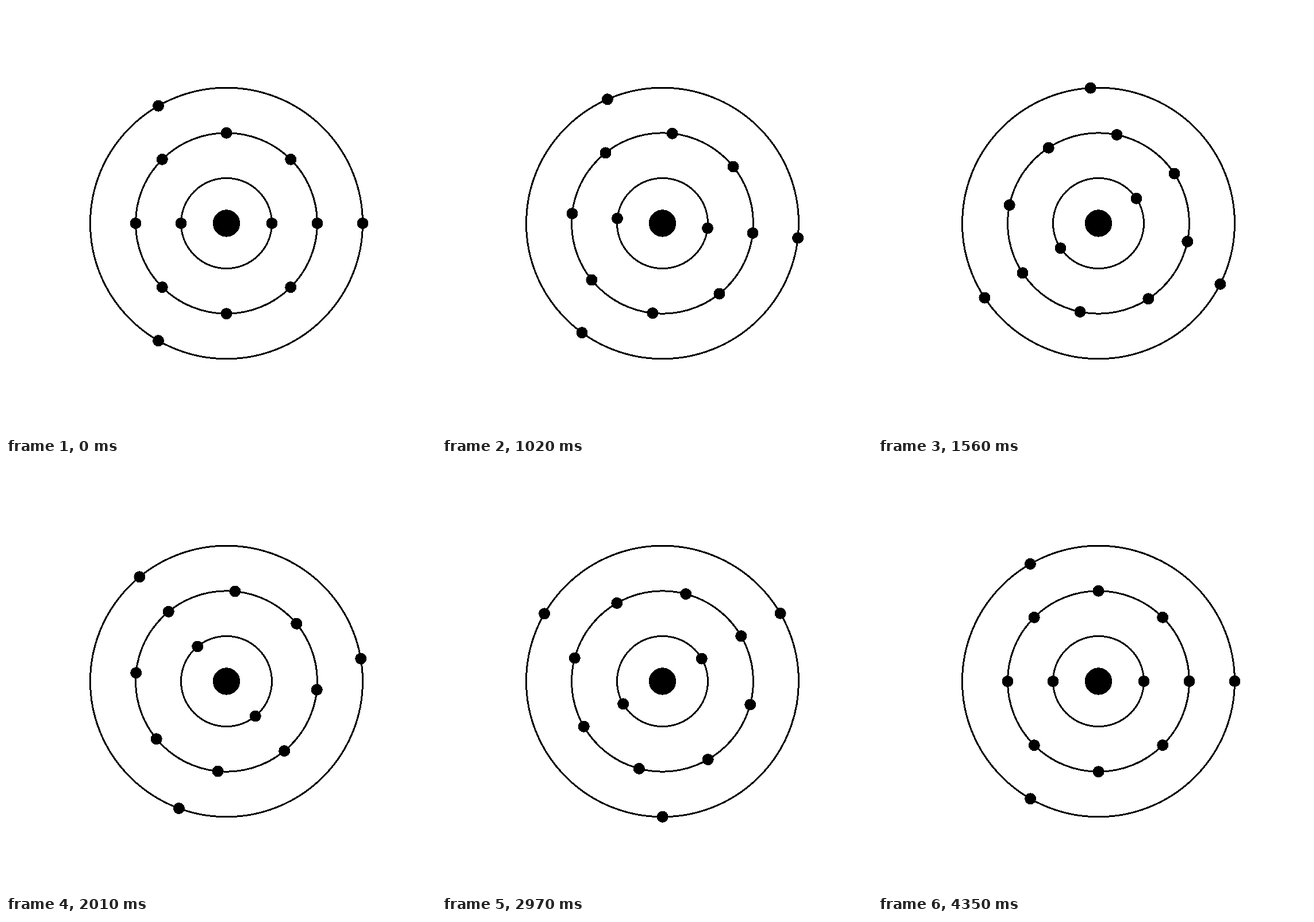
Write an HTML page that moves like this. It is 748 px wide and 748 px high and loops after 4.51 s.

```html
<!DOCTYPE html>
<html lang="en">
<head>
<meta charset="utf-8">
<title>Electron shells</title>
<style>
  html, body { margin: 0; height: 100%; overflow: hidden; background: #fff; }
  svg { display: block; width: 100vw; height: 100vh; }
</style>
</head>
<body>
<svg viewBox="0 0 748 748" shape-rendering="crispEdges"></svg>
<script>
const LOOP = 4510, STEP = 30, LAST = 145;
const CX = 383.5, CY = 378, RX = 79, RY = 78.6;
const TURN = 2 * Math.PI;
const svg = document.querySelector('svg');

function add(tag, attrs) {
  const el = document.createElementNS(svg.namespaceURI, tag);
  for (const key in attrs) el.setAttribute(key, attrs[key]);
  return svg.appendChild(el);
}

add('circle', { cx: CX, cy: CY, r: 23.7 });

const electrons = [];
[2, 8, 3].forEach((count, i) => {
  const rx = RX * (i + 1), ry = RY * (i + 1);
  add('ellipse', { cx: CX, cy: CY, rx, ry, fill: 'none', stroke: '#000', 'stroke-width': 3 });
  for (let k = 0; k < count; k++) {
    electrons.push({ rx, ry, start: TURN * k / count, el: add('circle', { r: 10 }) });
  }
});

// Two turns: a brief run-up, then a cubic slow-down.
function spin(step) {
  const ramp = 6;
  const run = step < ramp ? step * step / (2 * ramp) : step - ramp / 2;
  return -2 * TURN * (1 - run / 147) ** 3;
}

function draw(now) {
  const step = Math.min(LAST, Math.floor(now % LOOP / STEP));
  const angle = spin(step);
  for (const { rx, ry, start, el } of electrons) {
    el.setAttribute('cx', CX + rx * Math.cos(start + angle));
    el.setAttribute('cy', CY + ry * Math.sin(start + angle));
  }
}

let begin;
function tick(now) {
  begin ??= now;
  draw(now - begin);
  requestAnimationFrame(tick);
}
draw(0);
requestAnimationFrame(tick);
</script>
</body>
</html>
```
